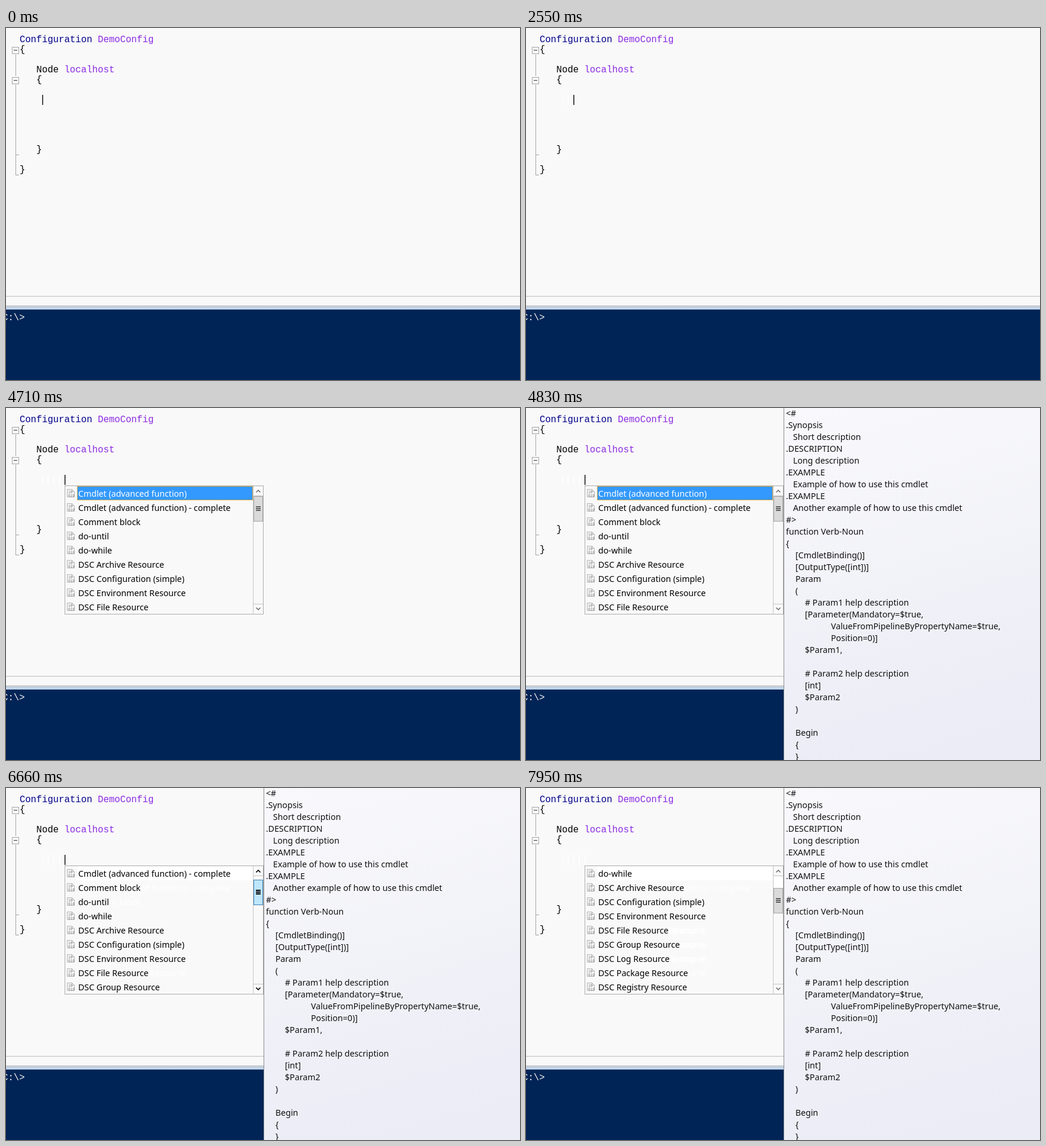
An HTML page with a canvas for the animation above (8 s loop, 868 by 595 pixels).

```html
<!DOCTYPE html>
<html lang="en">
<head>
<meta charset="utf-8">
<title>Snippet list</title>
<style>
  html, body { margin: 0; width: 100%; height: 100%; overflow: hidden; background: #f9f9f9; }
  canvas { display: block; }
</style>
</head>
<body>
<canvas id="stage" width="868" height="595"></canvas>
<script>
const ctx = document.getElementById('stage').getContext('2d');
const LOOP = 8000;
const MONO = '15.72px "Liberation Mono", monospace';
const SANS = '14.2px "Noto Sans", sans-serif';
const PAPER = '#f9f9f9';
const CHAR = 9.43;
const LEFT = 23;

// Times at which the caret blinks or steps one column to the right
const BLINKS = [300, 720, 1170, 1530, 2100, 2250, 3420, 3810, 4230, 4710,
  5070, 5550, 6060, 6480, 6990, 7470, 7950];
const STEPS = [2250, 2550, 2790, 2970];
const POPUP_AT = 4320, HELP_AT = 4830, HOVER_AT = 6330, LEAVE_AT = 7290;
const SCROLL_FROM = 6540, SCROLL_TO = 6960, TICK = 30;
const THUMB_TOP = 149, THUMB_TRAVEL = 20, THUMB_PER_ROW = 5;
const ROWS = 9, ROW_H = 24;

const SNIPPETS = [
  'Cmdlet (advanced function)', 'Cmdlet (advanced function) - complete',
  'Comment block', 'do-until', 'do-while', 'DSC Archive Resource',
  'DSC Configuration (simple)', 'DSC Environment Resource',
  'DSC File Resource', 'DSC Group Resource', 'DSC Log Resource',
  'DSC Package Resource', 'DSC Registry Resource'
];

const HELP = `<#
.Synopsis
   Short description
.DESCRIPTION
   Long description
.EXAMPLE
   Example of how to use this cmdlet
.EXAMPLE
   Another example of how to use this cmdlet
#>
function Verb-Noun
{
    [CmdletBinding()]
    [OutputType([int])]
    Param
    (
        # Param1 help description
        [Parameter(Mandatory=$true,
                   ValueFromPipelineByPropertyName=$true,
                   Position=0)]
        $Param1,

        # Param2 help description
        [int]
        $Param2
    )

    Begin
    {
    }`.split('\n');

const countPast = (times, t) => times.filter(at => t >= at).length;

function rect(x, y, w, h, color) {
  ctx.fillStyle = color;
  ctx.fillRect(x, y, w, h);
}

function frame(x, y, w, h, color) {
  ctx.strokeStyle = color;
  ctx.lineWidth = 1;
  ctx.strokeRect(x + 0.5, y + 0.5, w - 1, h - 1);
}

function line(points, color, width = 1) {
  ctx.strokeStyle = color;
  ctx.lineWidth = width;
  ctx.beginPath();
  points.forEach(([x, y]) => ctx.lineTo(x, y));
  ctx.stroke();
}

function text(str, x, y, color, font) {
  ctx.font = font;
  ctx.fillStyle = color;
  ctx.fillText(str, x, y);
}

function code(str, row, col, color) {
  text(str, LEFT + col * CHAR, Math.round(24 + row * 16.9), color, MONO);
}

function foldBox(y) {
  frame(10, y, 12, 12, '#a5a5a5');
  rect(13, y + 5, 6, 1, '#333');
}

function drawEditor() {
  rect(0, 0, 868, 595, PAPER);
  code('Configuration', 0, 0, '#00008b');
  code('DemoConfig', 0, 14, '#8a2be2');
  code('{', 1, 0, '#000');
  code('Node', 3, 3, '#000');
  code('localhost', 3, 8, '#8a2be2');
  code('{', 4, 3, '#000');
  code('}', 11, 3, '#000');
  code('}', 13, 0, '#000');

  foldBox(32);
  foldBox(83);
  const guide = '#a5a5a5';
  rect(16, 45, 1, 36, guide);
  rect(16, 96, 1, 153, guide);
  rect(16, 214, 6, 1, guide);
  rect(16, 248, 6, 1, guide);
}

function drawConsole() {
  rect(0, 453, 868, 1, '#bdbdbd');
  rect(0, 469, 868, 1, '#b5b5b5');
  rect(0, 470, 868, 1, '#e6ecf2');
  rect(0, 471, 868, 1, '#9fb0c4');
  const bar = ctx.createLinearGradient(0, 472, 0, 476);
  bar.addColorStop(0, '#d8e6f4');
  bar.addColorStop(1, '#a9c4de');
  rect(0, 472, 868, 4, bar);
  rect(0, 476, 868, 119, '#012456');
  text('C:\\>', -6, 494, '#f5f5f5', MONO);
}

function drawCaret(t) {
  const col = countPast(STEPS, t);
  const bar = (n, color) => rect(61.2 + n * CHAR, 113, 1.4, 17, color);
  for (let n = 0; n <= col; n++) bar(n, '#fff');
  if (countPast(BLINKS, t) % 2 === 0) bar(col, '#000');
}

function drawIcon(x, y) {
  line([[x + 0.5, y + 0.5], [x + 8.5, y + 0.5], [x + 12.5, y + 4.5],
    [x + 12.5, y + 13.5], [x + 0.5, y + 13.5], [x + 0.5, y]], '#b4b4b4');
  line([[x + 8.5, y + 0.5], [x + 8.5, y + 4.5], [x + 12.5, y + 4.5]], '#b4b4b4');
  const digits = '6px "DejaVu Sans Mono", monospace';
  text('10', x + 2, y + 7, '#777', digits);
  text('010', x + 2, y + 12.5, '#777', digits);
}

function drawList(first) {
  const label = (row, index, color) =>
    text(SNIPPETS[index], 122, 150 + row * ROW_H, color, SANS);

  if (first === 0) {
    rect(120, 132, 297, 24, '#3399ff');
    frame(120, 132, 297, 24, '#d8a94a');
  } else {
    rect(120, 132, 297, 24, '#fff');
  }
  // Pale traces of rows that have scrolled past
  for (let k = 0; k < first; k++)
    for (let row = 1; row < ROWS; row++) label(row, k + row, '#fff');

  for (let row = 0; row < ROWS; row++) {
    const y = 137 + row * ROW_H;
    drawIcon(103, y);
    if (first > 0 && row > 0) {
      ctx.font = SANS;
      rect(121, y - 2, ctx.measureText(SNIPPETS[first + row]).width + 2, 21, PAPER);
    }
    label(row, first + row, first === 0 && row === 0 ? '#fff' : '#000');
  }
}

function drawThumb(top, fill, edge, ink) {
  rect(418, top, 16, 43, fill);
  frame(418, top, 16, 43, edge);
  for (let i = 0; i < 3; i++) rect(422, top + 17 + i * 3, 8, 2, ink);
  line([[422.5, 142.5], [426, 139], [429.5, 142.5]], ink, 1.4);
  line([[422.5, 337.5], [426, 341], [429.5, 337.5]], ink, 1.4);
}

function drawScrollbar(top, hover) {
  rect(417, 132, 1, 216, '#c4c4c4');
  rect(418, THUMB_TOP, 16, top - THUMB_TOP, '#fff');
  rect(418, 148, 16, 1, '#c4c4c4');
  rect(418, 331, 16, 1, '#c4c4c4');
  drawThumb(top, '#dadada', '#a6a6a6', '#606060');
  ctx.globalAlpha = hover;
  if (hover) drawThumb(top, '#bee6fd', '#3c7fb1', '#000');
  ctx.globalAlpha = 1;
}

function drawPopup(t) {
  const tick = Math.floor(t / TICK) * TICK;
  const part = (tick - SCROLL_FROM) / (SCROLL_TO - SCROLL_FROM);
  const shift = Math.round(THUMB_TRAVEL * Math.min(1, Math.max(0, part)));
  let hover = t >= HOVER_AT ? 1 : 0;
  if (t >= LEAVE_AT) hover = t < LEAVE_AT + TICK ? 0.5 : 0;

  rect(99, 131, 336, 218, PAPER);
  drawList(Math.round(shift / THUMB_PER_ROW));
  drawScrollbar(THUMB_TOP + shift, hover);
  frame(99, 131, 336, 218, '#acacac');
}

function drawHelp() {
  const shade = ctx.createLinearGradient(435, 0, 600, 595);
  shade.addColorStop(0, '#f9f9fc');
  shade.addColorStop(1, '#ebecf5');
  rect(435, 0, 433, 595, shade);
  rect(435, 0, 1, 595, '#8a8a8a');
  HELP.forEach((str, i) => {
    const body = str.trimStart();
    text(body, 439 + (str.length - body.length) * 4, 14 + i * 20, '#111', SANS);
  });
}

function draw(now) {
  const t = now % LOOP;
  drawEditor();
  drawConsole();
  drawCaret(t);
  if (t >= POPUP_AT) drawPopup(t);
  if (t >= HELP_AT) drawHelp();
  requestAnimationFrame(draw);
}

requestAnimationFrame(draw);
</script>
</body>
</html>
```
